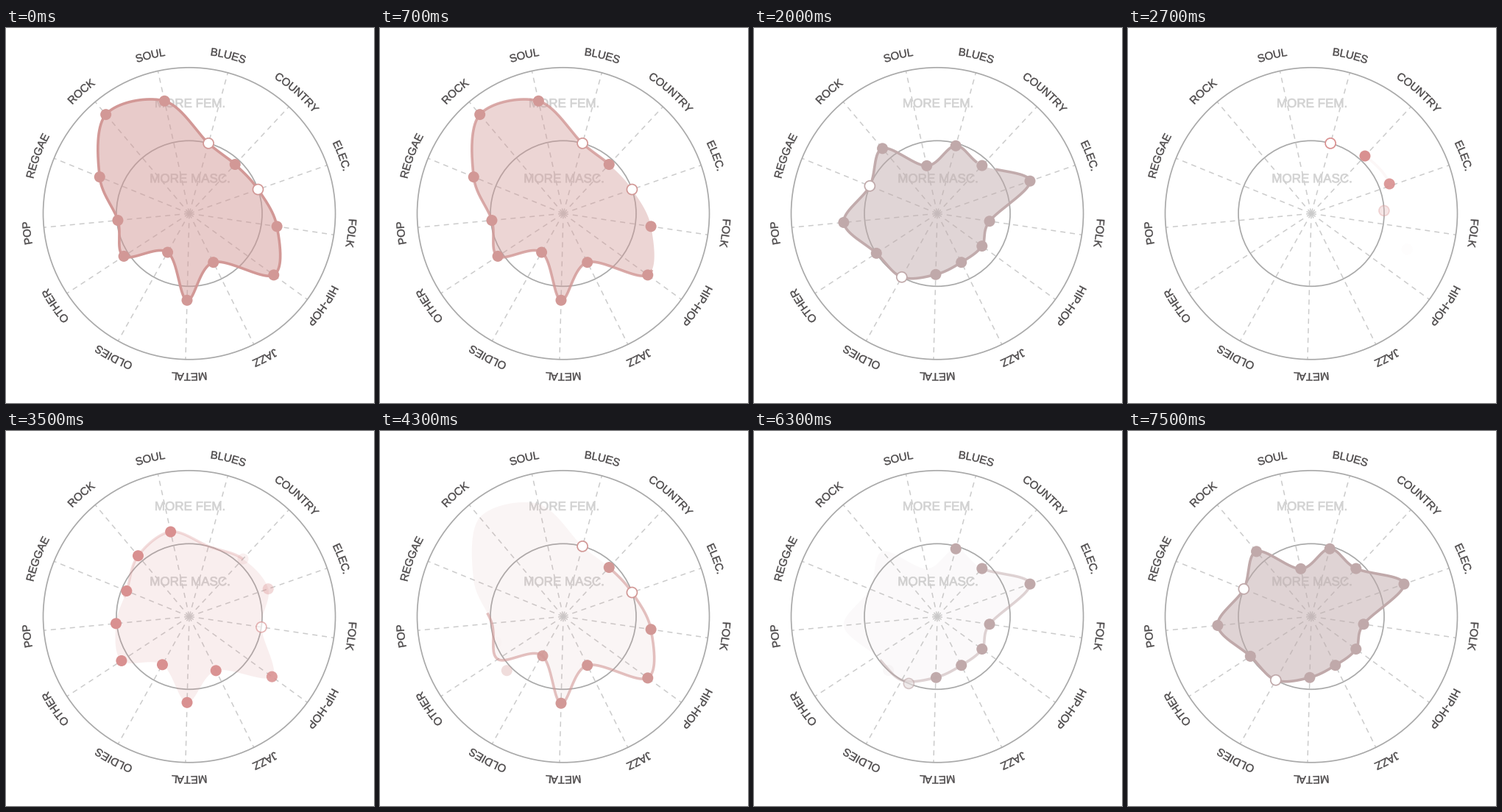
Write a matplotlib script that moves like this. It is 500x510 px and loops after 7.6 s.

```python
import numpy as np
import matplotlib.pyplot as plt
from matplotlib.animation import FuncAnimation
from matplotlib.colors import to_rgb
from matplotlib.patches import Circle, PathPatch, Polygon
from matplotlib.textpath import TextPath
from matplotlib.transforms import Affine2D

W, H, DPI = 500, 510, 72          # at 72 dpi one point is one pixel
STEP, LOOP = 50, 7600
CX, CY, R, MID = 249, 252.3, 198.5, 99
LABELS = ["BLUES", "COUNTRY", "ELEC.", "FOLK", "HIP-HOP", "JAZZ", "METAL",
          "OLDIES", "OTHER", "POP", "REGGAE", "ROCK", "SOUL"]
N = len(LABELS)
SLOT = 360 / N
AXES = 15.3 + SLOT * np.arange(N)  # degrees clockwise from the top

ROSE = ("#d29896", [MID, 91.3, MID, 120.4, 142, 74, 118, 60.4, 106.2,
                    97.5, 131.5, 176, 156.7])
MAUVE = ("#c0a9aa", [95.5, 89.2, 133.5, 71.8, 75.2, 74, 83, MID, 98.8,
                     127.7, MID, 115.6, 66.5])
CORAL = ("#d99090", [MID, 107, 113.6, MID, 139, 82, 117, 75, 110,
                     100, 92, 108, 118])

# shape, time it starts to enter, time it starts to leave
SCENES = [(ROSE, -2000, 520), (MAUVE, 1142, 1905), (CORAL, 2445, 3210),
          (ROSE, 3765, 5205), (MAUVE, 5800, 9000)]

DRAW, DOT, DELAY, SLIDE = 1000, 200, 56, 15.8
ERASE, DOT_WAIT, DOT_GAP, DOT_FADE = 500, 170, 18, 150


def ease(x):
    x = min(max(x, 0), 1)
    return 4 * x**3 if x < 0.5 else 1 - 4 * (1 - x)**3


def polar(r, deg):
    a = np.radians(deg)
    return np.stack([CX + r * np.sin(a), CY - r * np.cos(a)], axis=-1)


def closed_curve(radii, n=40):
    """Closed cardinal spline that begins at the second point."""
    p = np.roll(polar(np.array(radii), AXES), -1, axis=0)
    tan = (np.roll(p, -1, axis=0) - np.roll(p, 1, axis=0)) / 6
    t = np.linspace(0, 1, n, endpoint=False)[:, None]
    parts = []
    for i in range(N):
        a, d = p[i], p[(i + 1) % N]
        b, c = a + tan[i], d - tan[(i + 1) % N]
        parts.append((1 - t)**3 * a + 3 * t * (1 - t)**2 * b
                     + 3 * t**2 * (1 - t) * c + t**3 * d)
    return np.vstack(parts + [p[:1]])


def section(pts, lo, hi):
    """Part of a polyline between two fractions of its length."""
    s = np.r_[0, np.cumsum(np.hypot(*np.diff(pts, axis=0).T))]
    s /= s[-1]
    at = np.r_[lo, s[(s > lo) & (s < hi)], hi]
    return np.interp(at, s, pts[:, 0]), np.interp(at, s, pts[:, 1])


plt.rcParams["lines.scale_dashes"] = False
plt.rcParams["font.family"] = "Liberation Sans"
fig = plt.figure(figsize=(W / DPI, H / DPI), dpi=DPI, facecolor="white")
ax = fig.add_axes([0, 0, 1, 1])
ax.set(xlim=(0, W), ylim=(H, 0))
ax.axis("off")


def add_glyphs(path, move, color, weight):
    ax.add_patch(PathPatch(move.transform_path(path), fc=color, ec=color,
                           lw=weight, zorder=2))


def advance(text, size):
    """Pen position after a text, measured with a trailing letter."""
    def right(s):
        return TextPath((0, 0), s, size=size).get_extents().x1
    return right(text + "I") - right("I")


def arc_label(text, deg, size=15, base=217):
    """Set a word letter by letter along a circle."""
    stops = [0] + [advance(text[:i + 1], size) for i in range(len(text))]
    for ch, x0, x1 in zip(text, stops, stops[1:]):
        turn = np.radians(deg) + ((x0 + x1) / 2 - stops[-1] / 2) / (base + 5)
        move = (Affine2D().translate((x0 - x1) / 2, base).scale(1, -1)
                .rotate(turn).translate(CX, CY))
        add_glyphs(TextPath((0, 0), ch, size=size), move, "#4d4a4b", 0.4)


def inner_label(text, y):
    path = TextPath((0, 0), text, size=17)
    box = path.get_extents()
    move = (Affine2D().translate(-(box.x0 + box.x1) / 2, -(box.y0 + box.y1) / 2)
            .scale(1, -1).translate(250, y))
    add_glyphs(path, move, "#d2d2d2", 0.7)


for i, name in enumerate(LABELS):
    x, y = polar(np.array([0, R]), AXES[i]).T
    ax.plot(x, y, color="#cbcbcb", lw=1.5, ls=(0, (7, 6)),
            dash_capstyle="butt", zorder=1)
    arc_label(name, SLOT * (i + 0.5))
for r in (R, MID):
    ax.add_patch(Circle((CX, CY), r, fill=False, ec="#a9a9a9", lw=1.7, zorder=2))
inner_label("MORE FEM.", 102)
inner_label("MORE MASC.", 204.3)

area = ax.add_patch(Polygon([(0, 0), (1, 0), (0, 1)], lw=0, zorder=3))
line, = ax.plot([], [], lw=3.6, solid_capstyle="butt",
                solid_joinstyle="round", zorder=4)
dots = [ax.add_patch(Circle((CX, CY), 7, zorder=5)) for _ in range(N)]


def update(frame):
    now = frame * STEP
    (color, radii), start, leave = [s for s in SCENES if s[1] <= now][-1]
    rgb = np.array(to_rgb(color))
    age, gone = now - start, now - leave
    drawn, erased = ease(age / DRAW), ease(gone / ERASE)

    pts = closed_curve(radii)
    area.set_xy(pts)
    fill = 0.5 * ease((age / DRAW - 0.3) / 0.65) * (1 - erased)
    area.set_facecolor((*rgb, fill))

    if drawn > erased:
        line.set_data(*section(pts, erased, drawn))
    else:
        line.set_data([], [])
    line.set_color((*rgb, drawn * (1 - erased)))

    for i, (dot, r) in enumerate(zip(dots, radii)):
        p = ease((age - i * DELAY) / DOT)
        out = ease((gone - DOT_WAIT - i * DOT_GAP) / DOT_FADE)
        alpha = p * (1 - out)
        hollow = r == MID
        dot.center = polar(r, AXES[i] - SLIDE * (1 - p))
        dot.set_radius(7 if hollow else 7.5)
        dot.set_linewidth(1.7 if hollow else 0)
        dot.set_facecolor((*(rgb + (1 - rgb) * p if hollow else rgb), alpha))
        dot.set_edgecolor((*rgb, alpha))
    return [area, line, *dots]


anim = FuncAnimation(fig, update, frames=LOOP // STEP, interval=STEP,
                     init_func=lambda: update(0), repeat=True, repeat_delay=0,
                     blit=False)
plt.show()
```
